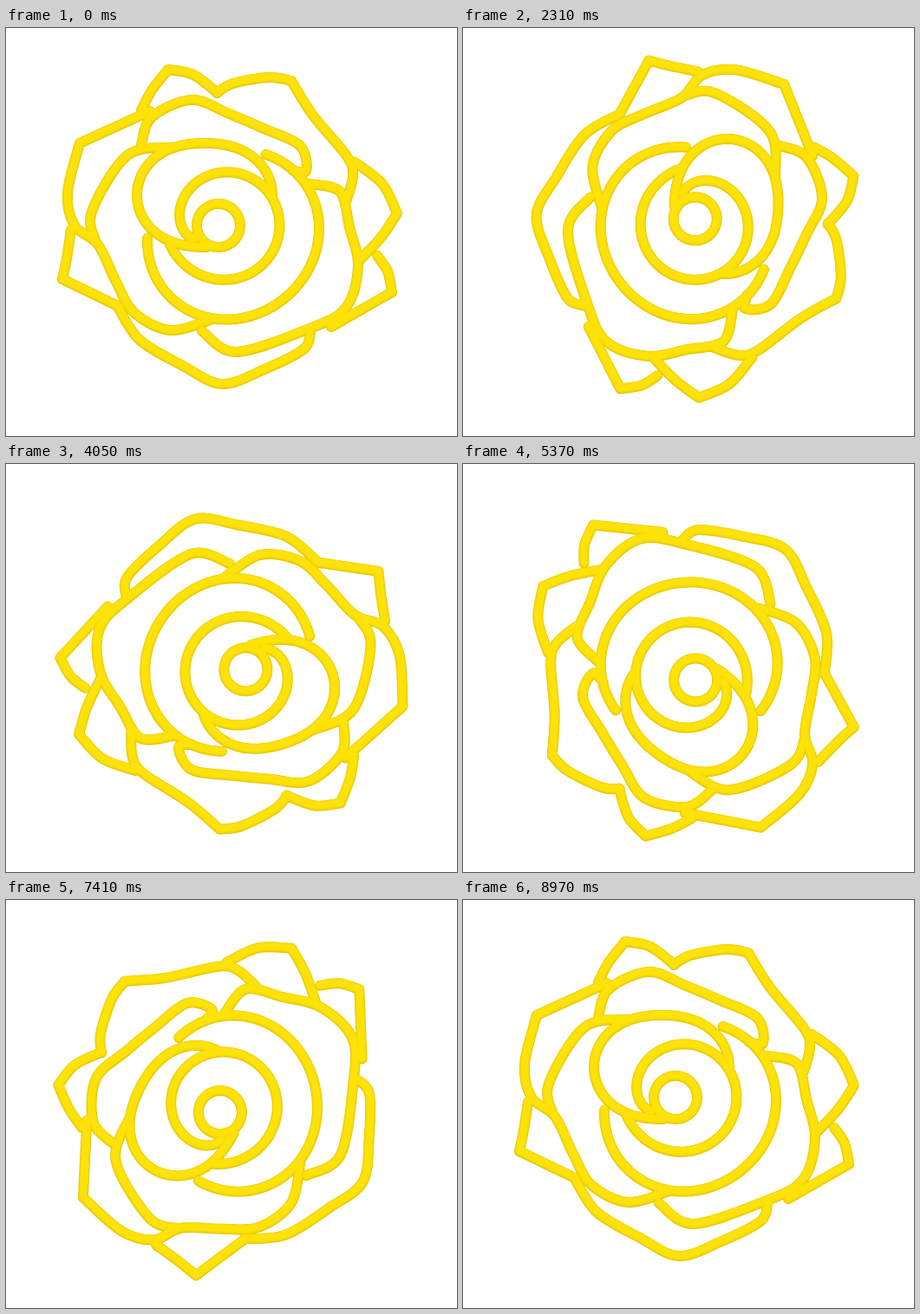
An HTML page with a canvas that plays this animation: 520 px wide and 471 px high, repeating every 9000 ms.

```html
<!DOCTYPE html>
<html lang="en">
<head>
<meta charset="utf-8">
<title>Turning rose</title>
<style>
  html, body { margin: 0; width: 100%; height: 100%; overflow: hidden; background: #fff; }
  canvas { display: block; }
</style>
</head>
<body>
<canvas id="stage" width="520" height="471"></canvas>
<script>
const ctx = document.getElementById('stage').getContext('2d');
const CX = 260, CY = 235;
const STEP = 30, STEPS = 300;
const RAD = Math.PI / 180;
const rose = new Path2D();

// Smooth curve through "x,y x,y ..."; "/" makes the point before it a sharp corner.
function petal(text) {
  const parts = text.split(' / ').map(s => s.split(' ').map(p => p.split(',').map(Number)));
  parts.forEach((pts, n) => {
    if (n) pts.unshift(parts[n - 1].at(-1));
    else rose.moveTo(...pts[0]);
    for (let i = 0; i < pts.length - 1; i++) {
      const b = pts[i], c = pts[i + 1];
      const a = pts[i - 1] || b, d = pts[i + 2] || c;
      rose.bezierCurveTo(
        b[0] + (c[0] - a[0]) / 6, b[1] + (c[1] - a[1]) / 6,
        c[0] - (d[0] - b[0]) / 6, c[1] - (d[1] - b[1]) / 6,
        c[0], c[1]);
    }
  });
}

// Polar curve: radius(angle in degrees, progress 0..1).
function swirl(x, y, from, to, radius) {
  const n = 90;
  for (let i = 0; i <= n; i++) {
    const t = i / n, a = from + (to - from) * t, r = radius(a, t);
    const p = [x + r * Math.cos(a * RAD), y + r * Math.sin(a * RAD)];
    i ? rose.lineTo(...p) : rose.moveTo(...p);
  }
}

// outer petals, clockwise from the top left
petal('156,95 168,72 187,48 / 216,54 244,75');
petal('243,75 262,64 304,57 329,61 / 354,101 393,148 400,170 393,198');
petal('402,155 434,180 451,214 / 433,241 409,267');
petal('428,263 440,281 445,305 / 403,329 375,345');
petal('128,320 154,360 204,390 249,411 298,394 343,371 351,352');
petal('75,233 70,266 65,290 / 127,320');
petal('166,96 85,133 / 71,190 79,228 106,250 127,293 148,329 190,349 238,336');

// middle petals
petal('156,135 168,103 214,83 257,99 297,116 339,136 346,165 330,164');
petal('192,138 140,147 99,212 104,248');
petal('350,180 385,189 396,230 406,275 391,324 345,349 265,374 226,350');

// heart
swirl(262, 239, -68, 178, a => 98 + 4 * Math.cos(2 * (a - 140) * RAD));
swirl(229, 193, 0, -272, a => 69 + 9 * Math.cos(2 * a * RAD));
swirl(254, 227, 155, 521, (a, t) => 61 + 8 * t ** 5 - 20 * Math.exp(-12 * t));
swirl(245, 228, 0, 360, () => 25);

// line width, colour and lift towards the light, from the shaded rim up
const layers = [[12, '#e3c800', 0], [10.4, '#f6db04', 0.6], [7.5, '#fee208', 1]];

function draw(now) {
  const frame = Math.floor(now / STEP) % STEPS;
  ctx.setTransform(1, 0, 0, 1, 0, 0);
  ctx.fillStyle = '#fff';
  ctx.fillRect(0, 0, 520, 471);
  ctx.lineCap = ctx.lineJoin = 'round';
  for (const [width, color, lift] of layers) {
    ctx.setTransform(1, 0, 0, 1, CX, CY - lift);
    ctx.rotate(2 * Math.PI * frame / (STEPS - 1));
    ctx.translate(-CX, -CY);
    ctx.lineWidth = width;
    ctx.strokeStyle = color;
    ctx.stroke(rose);
  }
}

function tick() {
  draw(performance.now());
  requestAnimationFrame(tick);
}
tick();
</script>
</body>
</html>
```
